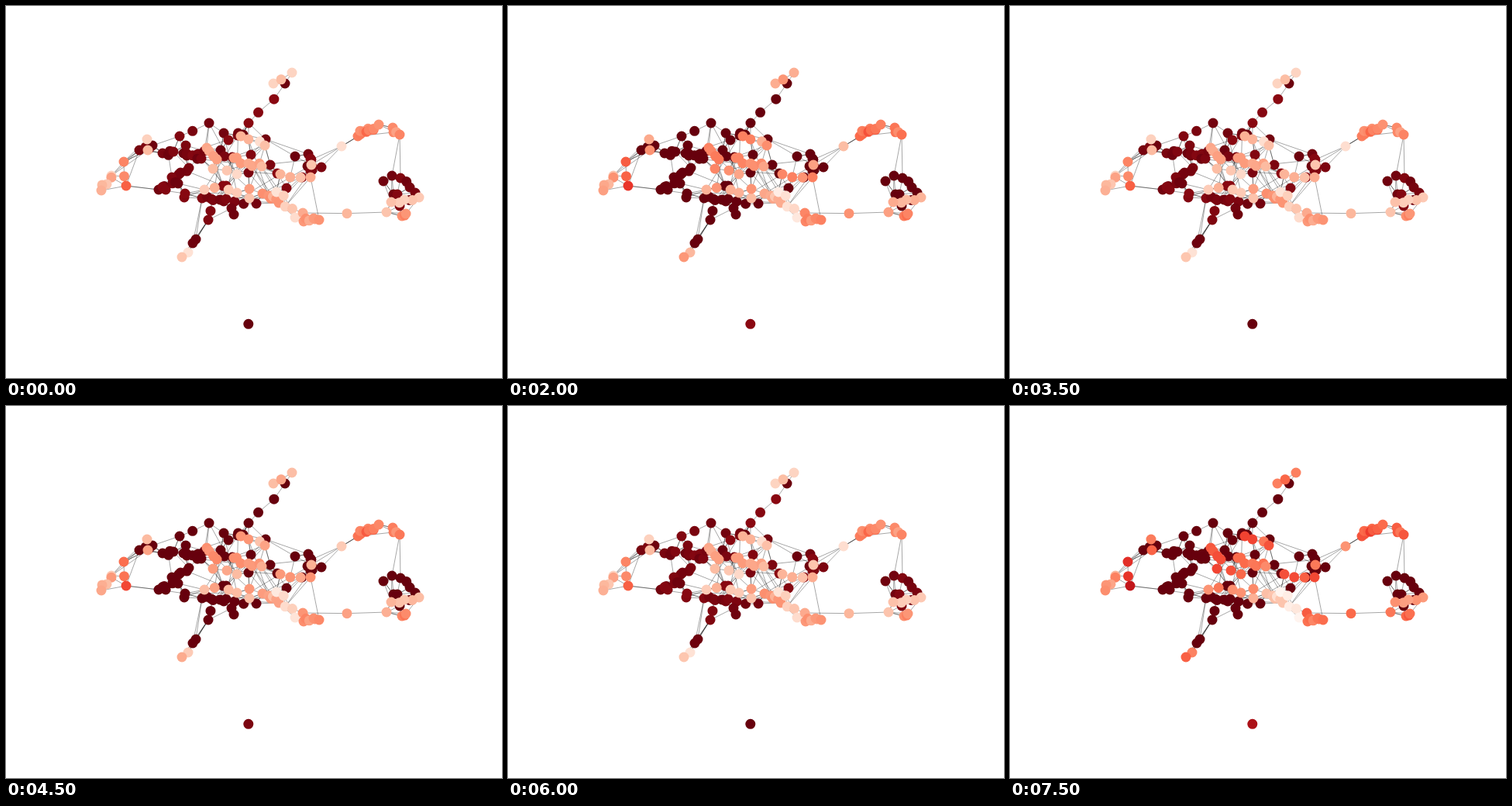
Write an HTML page with a canvas that moves like this. It is 640 px wide and 480 px high and loops after 8 s.

```html
<!DOCTYPE html>
<html>
<head>
<meta charset="utf-8">
<style>
html, body { margin: 0; width: 640px; height: 480px; overflow: hidden; background: #fff; }
canvas { display: block; }
</style>
</head>
<body>
<canvas id="stage" width="640" height="480"></canvas>
<script>
const ctx = document.getElementById('stage').getContext('2d');
const STEP = 500, STEPS = 16, RADIUS = 6.5, SPREAD = 8;

const reds = ['fff5f0', 'fee0d2', 'fcbba1', 'fc9272', 'fb6a4a', 'ef3b2c', 'cb181d', 'a50f15', '67000d']
  .map(hex => [0, 2, 4].map(i => parseInt(hex.slice(i, i + 2), 16)));

let seed = 7;
function random() {
  seed = (seed * 16807) % 2147483647;
  return seed / 2147483647;
}
const jitter = size => (random() - .5) * size;

const nodes = [], strands = [];

// A row of nodes between two points; inner ones stray a little
function strand(count, x1, y1, x2, y2, tone = .96, gain = 2) {
  const row = [];
  for (let i = 0; i < count; i++) {
    const p = count > 1 ? i / (count - 1) : 0;
    const stray = i && i < count - 1 ? SPREAD : 0;
    row.push({
      x: x1 + (x2 - x1) * p + jitter(stray),
      y: y1 + (y2 - y1) * p + jitter(stray),
      tone: tone + jitter(tone > .9 ? .06 : .16),
      gain, row
    });
  }
  nodes.push(...row);
  strands.push(row);
}

// Left arms
strand(3, 224, 168, 262, 151);
strand(4, 172, 186, 189, 180);
strand(5, 202, 190, 216, 188);
strand(7, 229, 190, 252, 197);
strand(2, 232, 180, 256, 187);
strand(5, 236, 209, 214, 221);
strand(7, 197, 237, 222, 229);
strand(2, 230, 247, 231, 242);
strand(2, 182, 172, 183, 186, .22, 1.8);
strand(3, 152, 201, 155, 232, .46, 1.7);
strand(5, 136, 219, 123, 238, .25, .7);

// Upper and lower tails
strand(4, 313, 151, 360, 100);
strand(3, 345, 100, 369, 86, .18, 1.8);
strand(3, 261, 276, 265, 249);
strand(2, 245, 301, 241, 306);
strand(2, 235, 318, 227, 324, .17, 2.1);

// Core
strand(5, 253, 248, 281, 252);
strand(4, 284, 249, 323, 255);
strand(2, 291, 261, 294, 269);
strand(2, 280, 232, 284, 232);
strand(3, 299, 167, 306, 166);
strand(2, 281, 164, 287, 173);
strand(3, 277, 186, 292, 195);
strand(2, 316, 192, 313, 215);
strand(3, 341, 205, 362, 235);
strand(2, 335, 172, 373, 194);
strand(4, 259, 183, 272, 198, .3, 1.6);
strand(4, 303, 168, 334, 180, .2, 2.2);
strand(7, 294, 196, 330, 207, .3, 1);
strand(3, 267, 210, 298, 217, .18, 2.4);
strand(4, 256, 237, 298, 241, .25, 1.2);
strand(2, 314, 248, 314, 236, .3, .4);
strand(6, 331, 242, 352, 254, .35, -1);
strand(5, 349, 240, 373, 273, .15, -.9);

// Right side
strand(6, 390, 191, 393, 213);
strand(3, 407, 208, 382, 221);
strand(4, 354, 217, 393, 221, .25, 2);
strand(2, 394, 205, 433, 181, .2, 1.6);
strand(10, 454, 168, 481, 153, .45, .8);
strand(4, 499, 157, 508, 166, .36, .9);
strand(2, 487, 226, 498, 219);
strand(3, 509, 222, 521, 234);
strand(2, 500, 243, 505, 243);
strand(3, 528, 241, 508, 258);
strand(5, 533, 247, 497, 253, .22, 1);
strand(3, 511, 271, 516, 268, .41, .8);
strand(3, 383, 267, 491, 266, .28, 1.6);
strand(6, 384, 278, 404, 276, .36, .8);

// Lone node
strand(1, 312.8, 410.3, 312.8, 410.3, 1, -1);

const edges = new Path2D();
function link(a, b) {
  edges.moveTo(a.x, a.y);
  edges.lineTo(b.x, b.y);
}
const distance = (a, b) => Math.hypot(a.x - b.x, a.y - b.y);
const nearest = (a, list) => list.reduce((m, n) => distance(a, n) < distance(a, m) ? n : m);

// Each row is joined up, and each of its ends to the closest three rows
for (const row of strands) {
  row.slice(1).forEach((node, i) => link(row[i], node));
  for (const end of [row[0], row[row.length - 1]]) {
    strands.filter(other => other !== row)
      .map(other => nearest(end, other))
      .sort((a, b) => distance(end, a) - distance(end, b))
      .slice(0, 3)
      .filter(node => distance(end, node) < 60)
      .forEach(node => link(end, node));
  }
}
// Loose threads through the core
const core = nodes.filter(n => n.x > 225 && n.x < 400 && n.y > 150 && n.y < 262);
for (const a of core) {
  const b = core[Math.floor(random() * core.length)];
  if (distance(a, b) < 85) link(a, b);
}

function colour(tone) {
  const pos = Math.max(0, Math.min(1, tone)) * 8;
  const i = Math.min(7, Math.floor(pos));
  return `rgb(${reds[i].map((c, k) => Math.round(c + (reds[i + 1][k] - c) * (pos - i)))})`;
}

// Three exponential rises, each falling back to nothing
function levelAt(step) {
  const [start, scale] = step < 7 ? [0, .0038] : step < 12 ? [7, .012] : [12, .018];
  return scale * (2.1 ** (step - start) - 1);
}

function draw(level) {
  ctx.clearRect(0, 0, 640, 480);
  ctx.lineWidth = .5;
  ctx.strokeStyle = 'rgba(0, 0, 0, .7)';
  ctx.stroke(edges);
  for (const { x, y, tone, gain } of nodes) {
    ctx.fillStyle = colour(tone + gain * level);
    ctx.beginPath();
    ctx.arc(x, y, RADIUS, 0, 2 * Math.PI);
    ctx.fill();
  }
}

function tick() {
  draw(levelAt(Math.floor(performance.now() / STEP) % STEPS));
  requestAnimationFrame(tick);
}
tick();
</script>
</body>
</html>
```
